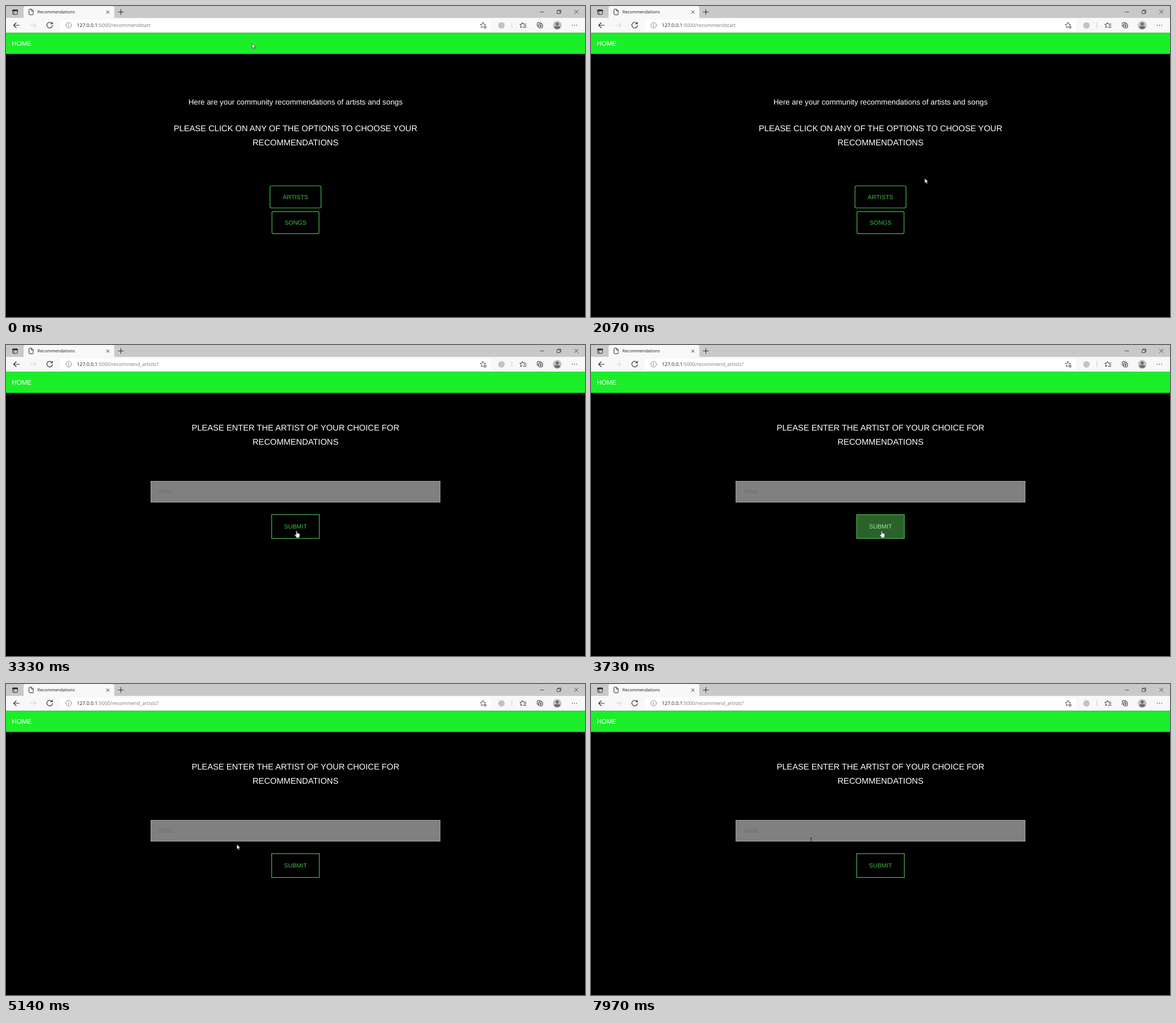
An HTML page that plays this animation: 1021x549 px, repeating every 8 s.

```html
<!DOCTYPE html>
<html lang="en">
<head>
<meta charset="utf-8">
<title>Recommendations</title>
<style>
html, body { margin: 0; width: 100%; height: 100%; overflow: hidden; background: #000; }
svg { display: block; width: 1021px; height: 549px; }
text { font-family: "Liberation Sans", Arial, sans-serif; text-rendering: geometricPrecision; }

.ui { font-family: "Open Sans", "Noto Sans", sans-serif; fill: #1b1b1b; }
.url { font-size: 8.7px; }
.path { fill: #767676; }
.icon { fill: none; stroke: #2c2c2c; stroke-width: 1; stroke-linecap: round; stroke-linejoin: round; }
.thin { stroke-width: .8; }
.mid { text-anchor: middle; fill: #fff; }
.lead { font-size: 13.3px; }
.head { font-size: 14.7px; }
.btn { stroke: #4db751; stroke-width: 1.2; fill: #2a622a; fill-opacity: 0; }
.label { font-size: 10.7px; text-anchor: middle; fill: #43b948; }

/* One 8 s timeline: 1% = 80 ms */
.start, .form, .cursor, .arrow, .hand, .beam, .fillA, .fillS, .textA, .textS {
  animation-duration: 8s; animation-iteration-count: infinite; animation-timing-function: linear;
}
.start, .form, .arrow, .hand, .beam { animation-timing-function: step-end; }
.start { animation-name: start; }
.form { animation-name: form; }
.cursor { animation-name: move; animation-timing-function: ease-in-out; }
.arrow { animation-name: arrow; }
.hand { animation-name: hand; }
.beam { animation-name: beam; }
.fillA { animation-name: fillA; }
.textA { animation-name: textA; }
.fillS { animation-name: fillS; }
.textS { animation-name: textS; }

@keyframes start { 0% { visibility: visible } 36.875%, 100% { visibility: hidden } }
@keyframes form { 0% { visibility: hidden } 36.875%, 100% { visibility: visible } }
@keyframes move {
  0%, 1.25% { transform: translate(434px, 66px) }
  9.375%, 18.75% { transform: translate(958px, 187px) }
  28.75%, 53.125% { transform: translate(512.5px, 328px) }
  56.25%, 62.5% { transform: translate(407px, 287px) }
  66.875%, 87.5% { transform: translate(407px, 275px) }
  96.25%, 100% { transform: translate(388px, 275px) }
}
@keyframes arrow {
  0% { visibility: visible } 27.5% { visibility: hidden }
  54.5% { visibility: visible } 65.5%, 100% { visibility: hidden }
}
@keyframes hand { 0% { visibility: hidden } 27.5% { visibility: visible } 54.5%, 100% { visibility: hidden } }
@keyframes beam { 0% { visibility: hidden } 65.5%, 100% { visibility: visible } }
@keyframes fillA { 0%, 27.5% { fill-opacity: 0 } 29.5%, 100% { fill-opacity: 1 } }
@keyframes textA { 0%, 27.5% { fill: #43b948 } 29.5%, 100% { fill: #a9dcab } }
@keyframes fillS { 0%, 44% { fill-opacity: 0 } 46%, 57% { fill-opacity: 1 } 59%, 100% { fill-opacity: 0 } }
@keyframes textS { 0%, 44% { fill: #43b948 } 46%, 57% { fill: #a9dcab } 59%, 100% { fill: #43b948 } }
</style>
</head>
<body>
<svg viewBox="0 0 1021 549">
  <rect width="1021" height="549"/>

  <!-- Tab strip -->
  <rect width="1021" height="22" fill="#c9c9c9"/>
  <path d="M31 22V4q0-4 4-4H187q4 0 4 4V22z" fill="#f8f8f8"/>
  <g class="icon">
    <rect x="11.8" y="6.8" width="8.4" height="8" rx="1.2"/>
    <path d="M12 8H20" stroke-width="2.4"/>
    <path d="M14 9V14.5" class="thin"/>
    <path d="M40.5 6.5q0-1 1-1H45L48 8.5V14.5q0 1-1 1H41.500q-1 0-1-1zM44.800 5.700V8.700H47.800"/>
    <path d="M177.300 8.500l4.600 4.600m0-4.600l-4.600 4.600"/>
    <path d="M198 10.500h9m-4.500-4.500v9"/>
    <path d="M941.800 10.500h6.500" class="thin"/>
    <path d="M972 8.500h5v5h-5zM973.500 8.300V7h5v5h-1.300" class="thin"/>
    <path d="M1002.500 7l6.500 6.500m0-6.500l-6.500 6.500" class="thin"/>
  </g>
  <text class="ui" x="55.5" y="13.4" font-size="7.5">Recommendations</text>

  <!-- Toolbar -->
  <rect y="21" width="1021" height="26.500" fill="#f8f8f8"/>
  <rect x="95" y="24" width="760" height="20" rx="2.500" fill="#fff"/>
  <g class="icon">
    <path d="M23.500 34H13.500m4.500-4.500L13.500 34l4.500 4.500" stroke-width="1.100"/>
    <path d="M43 34H53m-4.500-4.500L53 34l-4.500 4.500" stroke="#cfcfcf"/>
    <path d="M81.300 31.200A5 5 0 1 0 82 34M81.800 28.500V31.500H78.800" stroke-width="1.100"/>
    <g stroke="#6b6b6b" stroke-width=".8">
      <circle cx="110.500" cy="34" r="4.900"/>
      <path d="M110.500 33.300V36.500M110.500 31.500v.1"/>
    </g>
    <path id="star" class="thin" d="M841 29l1.500 3.100 3.400.5-2.500 2.400.6 3.400-3-1.600-3 1.600.6-3.400-2.500-2.400 3.400-.5z"/>
    <circle cx="844.800" cy="37.300" r="2.600" fill="#555" stroke="#fff" stroke-width=".5"/>
    <path d="M843.500 37.300h2.600m-1.300-1.300v2.600" stroke="#fff" stroke-width=".7"/>
    <path d="M892 29.500V38.500" stroke="#bbb" class="thin"/>
    <path d="M909.800 36.500l-2.200 1.700.7-3.500-2.300-2.300 3.200-.4 1.500-3 1.500 3H917M913.500 34.800H917M912 37.600H917" stroke-width="1"/>
    <rect x="936.800" y="29.300" width="7" height="7" rx="1.300"/>
    <rect x="939.200" y="31.700" width="7" height="7" rx="1.300" fill="#f8f8f8"/>
    <path d="M940.900 35.200h3.600m-1.800-1.800v3.600"/>
    <path d="M998.500 34h.1M1002.400 34h.1M1006.300 34h.1" stroke-width="1.500"/>
  </g>
  <circle cx="873.700" cy="34.200" r="5.700" fill="#c5c2bc"/>
  <circle cx="972" cy="34.200" r="7.700" fill="#c4c2c0"/>
  <circle cx="972" cy="31.800" r="2.700" fill="#6e6a68"/>
  <path d="M966.800 38.500q0-3 3-3h4.400q3 0 3 3q-5.200 4.500-10.400 0z" fill="#6e6a68"/>

  <!-- Page header -->
  <rect y="47.300" width="1021" height="37.300" fill="#1bef29"/>
  <text x="10.300" y="69.900" font-size="11.600" fill="#fff">HOME</text>

  <g class="start">
    <text class="ui url" x="124.800" y="37.200">127.0.0.1<tspan class="path">:5000/recommendstart</tspan></text>
    <text class="mid lead" x="510.500" y="173.800">Here are your community recommendations of artists and songs</text>
    <text class="mid head" x="510.500" y="220.600">PLEASE CLICK ON ANY OF THE OPTIONS TO CHOOSE YOUR</text>
    <text class="mid head" x="510.500" y="245.600">RECOMMENDATIONS</text>
    <rect class="btn fillA" x="465.500" y="317.500" width="90" height="39" rx="2.500"/>
    <text class="label textA" x="510.500" y="341.200">ARTISTS</text>
    <rect class="btn" x="469" y="362.800" width="83" height="39" rx="2.500"/>
    <text class="label" x="510.500" y="386.400">SONGS</text>
  </g>

  <g class="form">
    <text class="ui url" x="124.800" y="37.200">127.0.0.1<tspan class="path">:5000/recommend_artists?</tspan></text>
    <text class="mid head" x="510.500" y="151.300">PLEASE ENTER THE ARTIST OF YOUR CHOICE FOR</text>
    <text class="mid head" x="510.500" y="176.300">RECOMMENDATIONS</text>
    <rect x="255.500" y="240.500" width="510" height="37" fill="#808080" stroke="#a3a3a8"/>
    <text x="269.300" y="262.300" font-size="10.700" fill="#696d75">Artist</text>
    <rect class="btn fillS" x="468.500" y="299.500" width="84" height="42"/>
    <text class="label textS" x="510.500" y="324.100">SUBMIT</text>
  </g>

  <g class="cursor">
    <path class="arrow" d="M0 0V8.800L2 7l1.500 3.200 1.500-.7L3.600 6.400H6.200z" fill="#fff" stroke="#000" stroke-width=".6"/>
    <path class="hand" d="M-1 1q0-1 1-1t1 1V4.200q1-.7 1.600.2q1-.5 1.500.4q1.400-.3 1.400 1.200V8.500q0 1.500-.9 2.700V12.500H-.6V11.300L-3.300 7.700q-.6-1.200.4-1.500q.8-.1 1.900 1.300z" fill="#fff" stroke="#000" stroke-width=".6"/>
    <path class="beam" d="M-2-3.300H2M0-3.300V3.300M-1.500 3.300H1.500" fill="none" stroke="#1c1c1c" stroke-width=".9"/>
  </g>
</svg>
</body>
</html>
```
